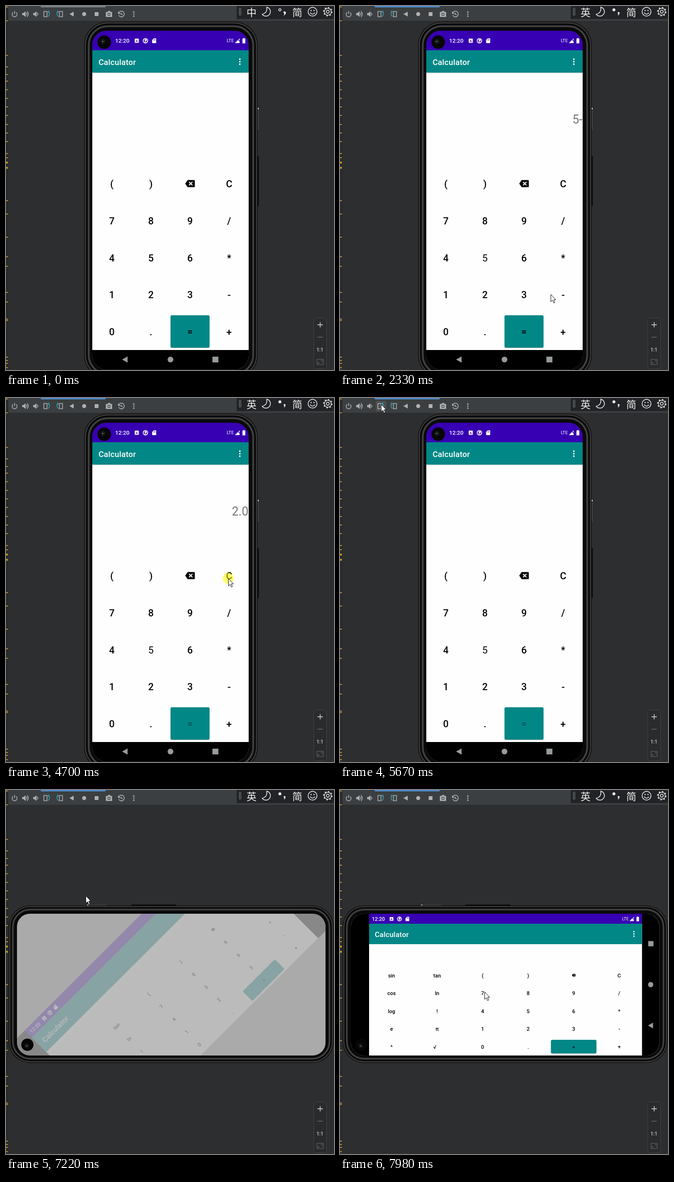
Write an HTML page that moves like this. It is 688 px wide and 765 px high and loops after 8 s.

```html
<!DOCTYPE html>
<html lang="en">
<head>
<meta charset="utf-8">
<title>Calculator in a phone emulator</title>
<style>
  html, body { margin: 0; width: 100%; height: 100%; overflow: hidden; background: #2d2e30; }
  svg { display: block; width: 688px; height: 765px; font-family: Roboto, sans-serif; font-weight: 500; }
  .line { fill: none; stroke: currentColor; stroke-width: 1.5; }
  .mid { text-anchor: middle; }
  .title { fill: #fff; letter-spacing: .0125em; }
  #ime { font-family: "Noto Sans CJK SC", "Noto Sans CJK", sans-serif; font-weight: 400; font-size: 21px; }
</style>
</head>
<body>
<svg viewBox="0 0 688 765">
  <defs>
    <clipPath id="tallClip"><rect x="181" y="52" width="328" height="712.5" rx="30"/></clipPath>
    <clipPath id="wideClip"><rect x="23" y="260" width="647" height="298" rx="27"/></clipPath>
    <g id="erase">
      <path d="M-10 0L-5-7.5H8.5Q10-7.5 10-6V6Q10 7.5 8.5 7.5H-5Z"/>
      <path d="M-2-3.5L5 3.5M5-3.5L-2 3.5" stroke="#fff" stroke-width="2"/>
    </g>
    <g id="statusLeft" fill="#fff">
      <text y="4.3" font-size="11.8">12:20</text>
      <rect x="41" y="-4.5" width="8.5" height="9" rx="1"/>
      <text class="mid" x="45.2" y="3" font-size="7.5" fill="#3700b3">A</text>
      <circle cx="63.5" r="4.7" fill="none" stroke="#fff" stroke-width="1.7"/>
      <path d="M62-3H66V1H63.5V4H62Z"/>
      <path d="M81-5H86V5H77.5V-1.5Z"/>
      <path d="M80.5-2.5V-.5M82.3-3.5V-.5M84-3.5V-.5" stroke="#3700b3" stroke-width=".8"/>
    </g>
    <g id="statusRight" fill="#fff">
      <text x="-36" y="3.4" font-size="9.5" font-weight="400">LTE</text>
      <path d="M-19 5L-9-5V5Z"/>
      <path d="M-13-3.500L-9 1" stroke="#3700b3" stroke-width="1.300"/>
      <path d="M-3-4.5H-1.5V-5.5H1.5V-4.5H3V5.5H-3Z"/>
    </g>
    <path id="dots" fill="none" stroke="#fff" stroke-width="3.4" stroke-linecap="round" d="M0-5.2V-5.19M0 0V.01M0 5.2V5.21"/>
    <path id="back" d="M-6 0L5.5-6.5V6.5Z"/>
    <g id="turn">
      <rect class="line" x="-6.5" y="-5.5" width="6.5" height="11"/>
      <path class="line" d="M2-5Q6-4 5 0T2 5.5" style="stroke:#3a9fb5"/>
      <path fill="#3a9fb5" d="M1-5L4.5-8V-2Z"/>
    </g>
    <path id="speaker" d="M-6-2.3H-3L1-6V6L-3 2.3H-6Z"/>
  </defs>

  <rect width="688" height="765" fill="#2d2e30"/>
  <rect width="5" height="765" fill="#2b2b2b"/>
  <g id="ticks" stroke="#b98a28" stroke-width="2"></g>

  <g id="toolbar" color="#afb1b3" fill="#afb1b3">
    <rect x="5" width="683" height="31" fill="#3c3f41"/>
    <rect id="tab" x="73" width="136" height="3"/>
    <rect id="hover" x="75" y="6" width="22" height="22" rx="3" fill="#4c5052"/>
    <path class="line" d="M15 13.3A5.2 5.2 0 1 0 21 13.3M18 10.5V17"/>
    <use href="#speaker" x="40" y="17"/>
    <path class="line" d="M42.5 14Q45 17 42.5 20M44 11Q49.5 17 44 23"/>
    <use href="#speaker" x="63" y="17"/>
    <path class="line" d="M65.5 14Q68 17 65.5 20"/>
    <use href="#turn" x="86" y="17"/>
    <use href="#turn" transform="matrix(-1 0 0 1 112 17)"/>
    <path d="M133 17L142 12V22Z"/>
    <circle cx="164" cy="17" r="4.2"/>
    <rect x="186" y="13" width="8" height="8"/>
    <path d="M209.5 12.5H213L214.5 10.5H218L219.5 12.5H222.5V23H209.5Z"/>
    <circle cx="216" cy="17.5" r="2.6" fill="#afb1b3" stroke="#3c3f41" stroke-width="1.3"/>
    <path class="line" d="M237.5 13A6 6 0 1 1 236.5 19M241.5 14V17.5L245 18.5"/>
    <path d="M235 11V16.5H240.5Z"/>
    <path d="M266.8 11.3h2.6v2.6h-2.6zM266.8 15.7h2.6v2.6h-2.6zM266.8 20.1h2.6v2.6h-2.6z"/>
  </g>

  <g id="ime" color="#f2f2f2" fill="#f2f2f2">
    <rect x="484" width="204" height="27.5" fill="#222326"/>
    <path d="M489.5 4V20M492.5 4V20" stroke="#8c8c8c"/>
    <text id="mode" class="mid" x="515" y="20.5"></text>
    <path class="line" d="M547 2.5Q549 14 537.5 17.5A9.5 9.5 0 1 0 547 2.5Z"/>
    <circle id="ring" cx="574.5" cy="8" r="2.4" stroke="#f2f2f2" stroke-width="1.4"/>
    <path id="comma" d="M583 11.5Q588 11 587 15Q586 19 582 20Q584.5 17 583.5 15.5Q580.5 13 583 11.5Z"/>
    <text class="mid" x="611" y="20.5">简</text>
    <circle class="line" cx="643" cy="12" r="9.3"/>
    <path class="line" d="M638 14Q643 20 648 14"/>
    <circle cx="640" cy="9.5" r="1.3"/><circle cx="646" cy="9.5" r="1.3"/>
    <circle class="line" cx="675" cy="12" r="3" style="stroke-width:1.3"/>
    <circle class="line" cx="675" cy="12" r="7.2" style="stroke-width:1.2"/>
    <circle class="line" cx="675" cy="12" r="8.700" style="stroke-width:2" stroke-dasharray="3 3.83"/>
  </g>

  <g color="#b5b7b9" fill="#b5b7b9">
    <rect x="645.5" y="655.5" width="27" height="107" rx="4" fill="#2b2b2c" stroke="#404244"/>
    <path class="line" style="stroke-width:1.8" d="M653.5 670H664.5M659 664.5V675.5"/>
    <path d="M653.5 696H664.5" stroke="#626466" stroke-width="1.5"/>
    <text class="mid" x="658.5" y="725.5" font-size="10" font-weight="700">1:1</text>
    <g color="#626466"><path class="line" style="stroke-width:1.2" d="M652.5 742.5H665.5V753.5H652.5ZM655 748.5V751H657.5M660.5 745H663V747.5"/></g>
  </g>

  <g class="phone">
    <path d="M529 214V260" stroke="#444" stroke-width="2"/>
    <path d="M529 214V217" stroke="#ddd" stroke-width="2"/>
    <path d="M529 316V420" stroke="#0a0a0a" stroke-width="2.5"/>
    <rect x="164" y="33" width="364" height="750" rx="49" fill="#090909"/>
    <rect x="166.5" y="35.5" width="359" height="745" rx="47" fill="none" stroke="#3e3e3c" stroke-width="2.4"/>
    <rect x="173.5" y="42.5" width="345" height="731" rx="40" fill="none" stroke="#2c2c2c" stroke-width="4.5"/>
    <rect x="173.5" y="42.5" width="345" height="731" rx="40" fill="none" stroke="#505050" stroke-width="1.6"/>
    <g clip-path="url(#tallClip)">
      <rect x="181" y="52" width="328" height="713" fill="#aaa"/>
      <g id="tall">
        <rect x="181" y="52" width="328" height="713"/>
        <rect x="181" y="93" width="328" height="630" fill="#fefefe"/>
        <rect x="181" y="52" width="328" height="41" fill="#3700b3"/>
        <rect x="181" y="140" width="328" height="1.5" fill="#ddd"/>
        <rect x="181" y="93" width="328" height="47" fill="#018786"/>
        <use href="#statusLeft" x="229" y="73"/>
        <use href="#statusRight" x="499" y="73"/>
        <text class="title" x="194.2" y="123.6" font-size="16.7">Calculator</text>
        <use href="#dots" x="490.5" y="117"/>
        <text id="display" x="508.5" y="247" font-size="25" font-weight="400" text-anchor="end" fill="#757575"></text>
        <g id="tallKeys"></g>
        <g fill="#969c9c">
          <use href="#back" x="249.5" y="743"/>
          <circle cx="345" cy="743" r="6"/>
          <rect x="433" y="737" width="12.5" height="12"/>
        </g>
      </g>
    </g>
  </g>

  <g id="wideScreen" clip-path="url(#wideClip)">
    <g id="wide">
      <rect x="23" y="260" width="647" height="298"/>
      <rect x="61" y="281" width="572.5" height="277" fill="#fefefe"/>
      <rect x="61" y="260" width="572.5" height="21" fill="#3700b3"/>
      <rect x="61" y="281" width="572.5" height="43" fill="#018786"/>
      <use href="#statusLeft" transform="translate(67 271) scale(.9085)"/>
      <use href="#statusRight" transform="translate(624.5 271) scale(.9085)"/>
      <text class="title" x="73" y="308.6" font-size="15.2">Calculator</text>
      <use href="#dots" transform="translate(616.5 302.5) scale(.9)"/>
      <g id="wideKeys"></g>
      <g fill="#969c9c">
        <rect x="646.5" y="317.5" width="11" height="11"/>
        <circle cx="651.7" cy="409" r="5.5"/>
        <use href="#back" transform="translate(651.5 495) scale(.92)"/>
      </g>
    </g>
  </g>

  <g class="phone">
    <circle cx="206" cy="76" r="14.2" fill="#060606"/>
    <circle cx="203.5" cy="74.5" r="4.5" fill="#121415" stroke="#242728"/>
    <circle cx="203" cy="74.5" r="1.3" fill="#7c8686"/>
  </g>

  <g id="cursor">
    <circle id="click" r="11.7" fill="#ff0" opacity=".55"/>
    <path d="M.5.5V16L4 12.7 6.5 18.5 9 17.4 6.5 11.7H11Z" fill="#fff" stroke="#111"/>
  </g>
</svg>

<script>
const LOOP = 8000, TURN_PHONE = 5870, TURN_SCREEN = 7150, STEP = 70, FOCUS = 1220;
const $ = id => document.getElementById(id);
const show = (id, on) => $(id).setAttribute('display', on ? 'inline' : 'none');
const set = (id, attrs) => { for (const k in attrs) $(id).setAttribute(k, attrs[k]); };

// time, x, y of the pointer tip
const pointer = [
  [180, 592, 735], [320, 476, 598], [590, 474, 597], [1150, 303, 528], [1500, 303, 528],
  [2000, 466, 606], [2260, 466, 606], [2500, 384, 605], [2720, 384, 605], [3030, 382, 674],
  [3450, 382, 674], [3940, 269, 214], [4060, 290, 207], [4600, 466, 379], [4900, 466, 379],
  [5600, 92, 13], [5670, 86, 13], [6120, 86, 13], [6350, 167, 222], [7740, 167, 222], [7980, 303, 424]
];
// time, angle, new layout opacity, old layout opacity
const turning = [
  [7150, -72, 0, .4], [7220, -45, .2, 0], [7290, -21, .55, 0],
  [7360, -8, .85, 0], [7430, -2, 1, 0], [7500, 0, 1, 0]
];
const clicks = [[1365, 1500], [2050, 2190], [2560, 2690], [3250, 3380], [4680, 4860]];
const entries = [[0, ''], [1500, '5'], [2190, '5-'], [2690, '5-3'], [3380, '2.0'], [4880, '']];

function track(keys, t) {
  const next = keys.findIndex(k => k[0] > t);
  if (next < 0) return keys[keys.length - 1].slice(1);
  if (next === 0) return keys[0].slice(1);
  const a = keys[next - 1], b = keys[next], p = (t - a[0]) / (b[0] - a[0]);
  return a.slice(1).map((v, i) => v + (b[i + 1] - v) * p);
}

function buildKeys(id, rows, x0, y0, dx, dy, size, buttonTop, buttonHeight, eraseScale) {
  let out = '';
  rows.forEach((row, r) => row.split(' ').forEach((label, c) => {
    const x = x0 + dx * c, y = y0 + dy * r;
    if (label === '=') {
      const box = `x="${x - dx / 2}" width="${dx}" height="${buttonHeight}" rx="3"`;
      out += `<rect ${box} y="${buttonTop + 1}" fill="#bbb"/>` +
             `<rect ${box} y="${buttonTop}" fill="#018786"/>`;
    }
    out += label === '<'
      ? `<use href="#erase" transform="translate(${x} ${y - .5}) scale(${eraseScale})"/>`
      : `<text class="mid key${label}" x="${x - (label === '√' ? 5 : 0)}" y="${y + size * .36}">${label}</text>`;
  }));
  $(id).setAttribute('font-size', size);
  $(id).innerHTML = out;
}

const basic = ['( ) < C', '7 8 9 /', '4 5 6 *', '1 2 3 -', '0 . = +'];
const extra = ['sin tan', 'cos ln', 'log !', 'e π', '^ √'];
buildKeys('tallKeys', basic, 222, 373.8, 82, 77.8, 20.2, 650, 68, 1);
buildKeys('wideKeys', basic.map((row, i) => extra[i] + ' ' + row), 108.2, 389.7, 95.5, 37.5, 11, 525, 28.5, .36);
const equals = document.querySelector('#tallKeys text[class$="="]');
const five = document.querySelector('#tallKeys .key5');

$('ticks').innerHTML = [2, 31, 104, 128, 144, 158, 176, 194, 212, 230, 249, 267, 285, 310, 319, 328, 330,
  339, 341, 409, 437, 486, 527, 547, 602, 622, 658, 661, 738, 745, 751, 760]
  .map(y => `<path d="M0 ${y}H4"/>`).join('');

function draw(t) {
  const focused = t >= FOCUS, sideways = t >= TURN_PHONE, turned = t >= TURN_SCREEN;
  set('tab', { fill: focused ? '#4a88c7' : '#787c7f' });
  $('mode').textContent = focused ? '英' : '中';
  set('ring', { fill: focused ? '#f2f2f2' : 'none' });
  set('comma', { transform: focused ? 'translate(146 3) scale(.75 .85)' : '' });
  show('hover', t >= 5530 && t < 6150);

  const [x, y] = track(pointer, t);
  show('cursor', t >= 180);
  show('click', clicks.some(([from, to]) => t >= from && t < to));
  set('cursor', { transform: `translate(${x} ${y})` });

  $('display').textContent = entries.filter(e => t >= e[0]).pop()[1];
  equals.setAttribute('opacity', t < 3000 || sideways ? 1 : t < 3420 ? 0 : .4);
  five.setAttribute('font-weight', t > 1430 && !sideways ? 400 : 500);

  document.querySelectorAll('.phone').forEach(g =>
    g.setAttribute('transform', sideways ? 'matrix(0 -.9085 .9085 0 -24.24 722.44)' : ''));
  const stepped = TURN_SCREEN + Math.floor((t - TURN_SCREEN) / STEP) * STEP;
  const [angle, fresh, old] = turned ? track(turning, stepped) : [-90, 0, 1];
  show('wideScreen', turned);
  set('wide', { transform: `rotate(${angle} 346.5 409)`, opacity: fresh });
  set('tall', { transform: `rotate(${angle + 90} 345 408)`, opacity: old });
}

const start = performance.now();
function tick() {
  draw((performance.now() - start) % LOOP);
  requestAnimationFrame(tick);
}
tick();
</script>
</body>
</html>
```
